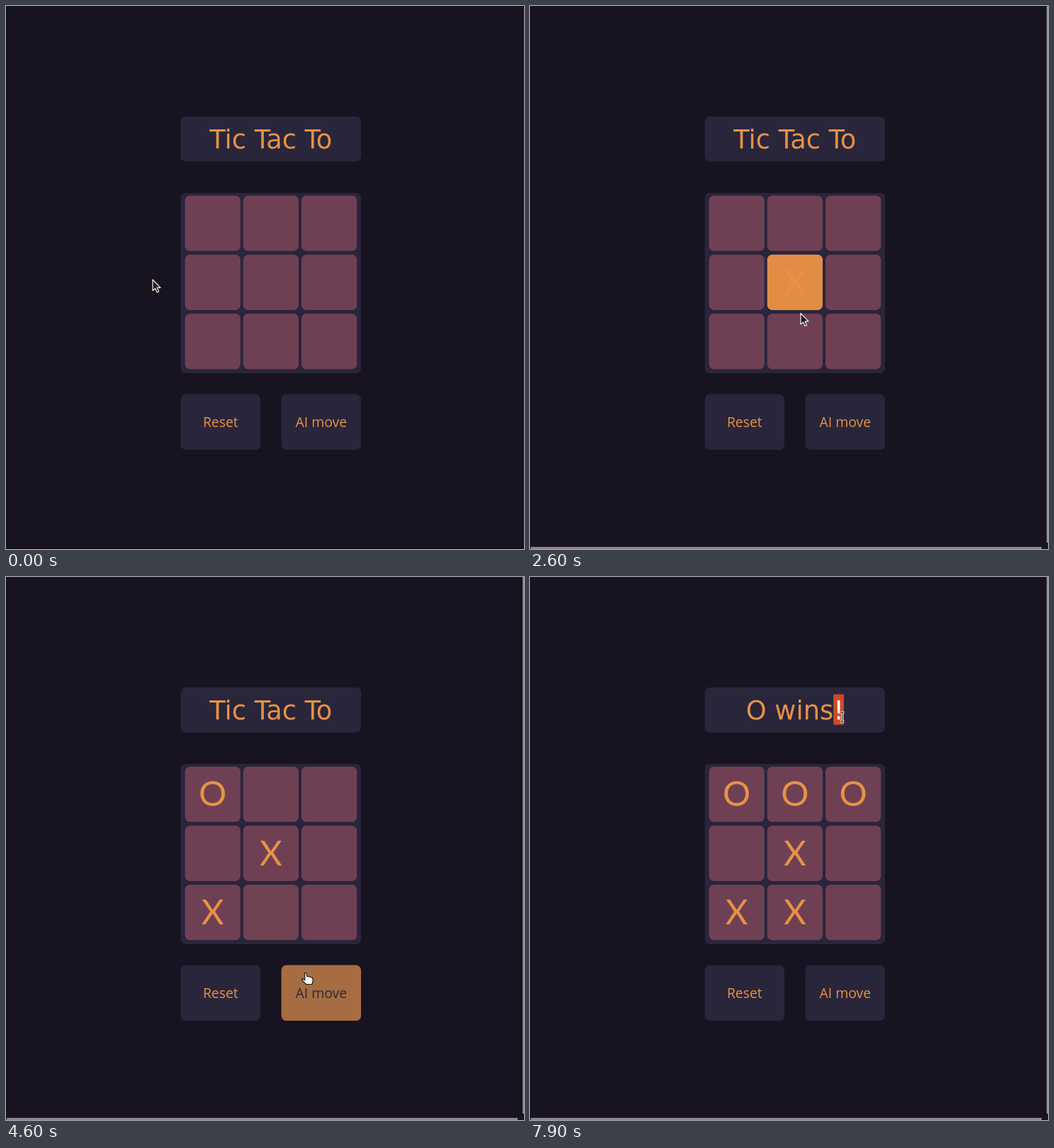
Animation, 731 px wide and 766 px high, one loop 8 s. Source, as an HTML page with a canvas:

```html
<!DOCTYPE html>
<html lang="en">
<head>
<meta charset="utf-8">
<title>Tic Tac To</title>
<style>
html, body { margin: 0; width: 100%; height: 100%; overflow: hidden; background: #181320; }
canvas { display: block; }
</style>
</head>
<body>
<canvas id="stage" width="731" height="766"></canvas>
<script>
const ctx = document.getElementById('stage').getContext('2d');
const LOOP = 8000, STEP = 100, FADE = 300;
const BG = '#181320', PANEL = '#29253a', CELL = '#6f4054', ORANGE = '#e79246';

// Pointer path: time, x, y of the hot spot; a lone time means "stay until"
const PATH = [
  [1050, 207, 386], [1500, 253, 455], [1770, 333, 463], [1900, 372, 450],
  [2400, 372, 395], [2800, 392, 472], [3005, 432, 548], [3300, 449, 576], [3400],
  [3600, 430, 545], [3850, 333, 476], [4100, 292, 472], [4290, 333, 488],
  [4483, 413, 548], [4600, 423, 558], [4900, 432, 574], [5100],
  [5466, 385, 512], [5700, 356, 482], [5995, 415, 548], [6200, 430, 577],
  [6400, 434, 582], [6800], [7020, 440, 547], [7700, 453, 207], [7800], [7900, 440, 197]
];
let prev;
const keys = PATH.map(([t, x = prev.x, y = prev.y]) => prev = { t, x, y });

// When each cell gets its mark
const mark = (i, sign, t) => ({ i, sign, t });
const marks = [
  mark(4, 'X', 2400), mark(0, 'O', 3300), mark(6, 'X', 4100),
  mark(2, 'O', 4900), mark(7, 'X', 5600), mark(1, 'O', 6400)
];

const box = (x, y, w, h, extra) => ({ x, y, w, h, ...extra });
const cells = Array.from({ length: 9 }, (_, i) =>
  box(252.6 + 82.2 * (i % 3), 267.4 + 83.3 * Math.floor(i / 3), 78.2, 78.2, { base: CELL }));
const buttons = ['Reset', 'AI move'].map((label, i) =>
  box(246.6 + 142 * i, 547.6, 112.4, 78.4, { base: PANEL, label }));
const title = box(246.6, 155.8, 254.4, 63.6);
const board = box(246.6, 263.8, 254.4, 254.2);
const targets = [...cells, ...buttons];

const inside = (b, p) => p.x >= b.x && p.x <= b.x + b.w && p.y >= b.y && p.y <= b.y + b.h;

function pointer(t) {
  const i = keys.findIndex(k => k.t > t);
  if (i < 0) return keys.at(-1);
  if (i === 0) return keys[0];
  const a = keys[i - 1], b = keys[i], k = (t - a.t) / (b.t - a.t);
  return { x: a.x + (b.x - a.x) * k, y: a.y + (b.y - a.y) * k };
}

// CSS "ease" curve
function ease(p) {
  if (p >= 1) return 1;
  let lo = 0, hi = 1, u = 0;
  const bez = (a, b) => 3 * a * u * (1 - u) ** 2 + 3 * b * u * u * (1 - u) + u ** 3;
  for (let n = 0; n < 20; n++) {
    u = (lo + hi) / 2;
    if (bez(0.25, 0.25) < p) lo = u; else hi = u;
  }
  return bez(0.1, 1);
}

// Hover changes per target, with the level each fade starts from
function level(b, t) {
  const last = b.hover.findLast(h => h.t <= t);
  return last ? last.from + (last.on - last.from) * ease((t - last.t) / FADE) : 0;
}
for (const b of targets) {
  b.hover = [];
  let over = false;
  for (let t = 0; t < LOOP; t += 5) {
    const now = inside(b, pointer(t));
    if (now !== over) b.hover.push({ t, on: +now, from: level(b, t) });
    over = now;
  }
}

function fillBox(b, color) {
  ctx.fillStyle = color;
  ctx.beginPath();
  ctx.roundRect(b.x, b.y, b.w, b.h, 7);
  ctx.fill();
}

function fillTarget(b, t) {
  fillBox(b, b.base);
  ctx.globalAlpha = level(b, t);
  fillBox(b, ORANGE);
  ctx.globalAlpha = 1;
}

function text(str, x, y, font, color, align = 'center') {
  ctx.font = font;
  ctx.textAlign = align;
  ctx.fillStyle = color;
  ctx.fillText(str, x, y);
}

function shape(p, path, fill, line) {
  ctx.save();
  ctx.translate(p.x, p.y);
  ctx.lineJoin = 'round';
  ctx.lineWidth = 1.2;
  ctx.fillStyle = fill;
  ctx.strokeStyle = line;
  ctx.fill(path);
  ctx.stroke(path);
  ctx.restore();
}

const ARROW = new Path2D('M0 0V15.5L3.6 12.4 6 18 8.6 17 6.2 11.4H11Z');
const HAND = new Path2D('M-1.5 .5H.8L1.6 5.5 5 6 9.6 7.4 10.2 12 8.8 16.5H.5L-5.4 10.4-4.8 8.8-1.2 10.6Z');

function beam(x, y) {
  const bars = (w, color) => {
    ctx.strokeStyle = color;
    ctx.lineWidth = w;
    ctx.beginPath();
    ctx.moveTo(x, y - 6.5);
    ctx.lineTo(x, y + 6.5);
    for (let dy = -6.5; dy < 7; dy += 13) {
      ctx.moveTo(x - 3, y + dy);
      ctx.lineTo(x + 3, y + dy);
    }
    ctx.stroke();
  };
  bars(3, '#f4f4f4');
  bars(1, '#111');
}

function drawPointer(p, signs) {
  const free = cells.some((c, i) => !signs[i] && inside(c, p));
  if (inside(title, p)) beam(p.x + 0.5, p.y + 0.5);
  else if (free || buttons.some(b => inside(b, p))) shape(p, HAND, '#fff', '#1a1a1a');
  else shape(p, ARROW, '#1c1a1e', '#f4efe8');
}

function drawTitle(t) {
  const font = '36.8px "DejaVu Sans", sans-serif', mid = 373.8, y = 200.5;
  fillBox(title, PANEL);
  if (t < 6400) return text('Tic Tac To', mid, y, font, ORANGE);
  ctx.font = font;
  const width = s => ctx.measureText(s).width;
  const left = mid - width('O wins!') / 2, end = left + width('O wins');
  const picked = t >= 7900;
  text('O wins', left, y, font, ORANGE, 'left');
  if (picked) {
    ctx.fillStyle = '#d04a27';
    ctx.fillRect(end, 165.5, width('!'), 43);
  }
  text('!', end, y, font, picked ? '#fff' : ORANGE, 'left');
}

function draw(t) {
  const p = pointer(t);
  const signs = {};
  for (const m of marks) if (t >= m.t) signs[m.i] = m.sign;

  ctx.fillStyle = BG;
  ctx.fillRect(0, 0, 731, 766);
  if (t >= 1100) {
    ctx.fillStyle = '#8d898c';
    ctx.fillRect(729, 0, 2, 757);
    ctx.fillRect(1, 763, 721, 3);
  } else {
    ctx.fillStyle = '#140f1a';
    ctx.fillRect(0, 762, 731, 4);
  }

  drawTitle(t);
  fillBox(board, PANEL);
  cells.forEach((c, i) => {
    fillTarget(c, t);
    if (signs[i]) text(signs[i], c.x + c.w / 2, c.y + 56, '49px Lato, sans-serif', ORANGE);
  });
  for (const b of buttons) {
    fillTarget(b, t);
    text(b.label, b.x + b.w / 2, 594, '19.4px "Open Sans", sans-serif', inside(b, p) ? PANEL : ORANGE);
  }
  drawPointer(p, signs);
}

const start = performance.now();
function tick() {
  const t = (performance.now() - start) % LOOP;
  draw(Math.floor(t / STEP) * STEP);
  requestAnimationFrame(tick);
}
tick();
</script>
</body>
</html>
```
